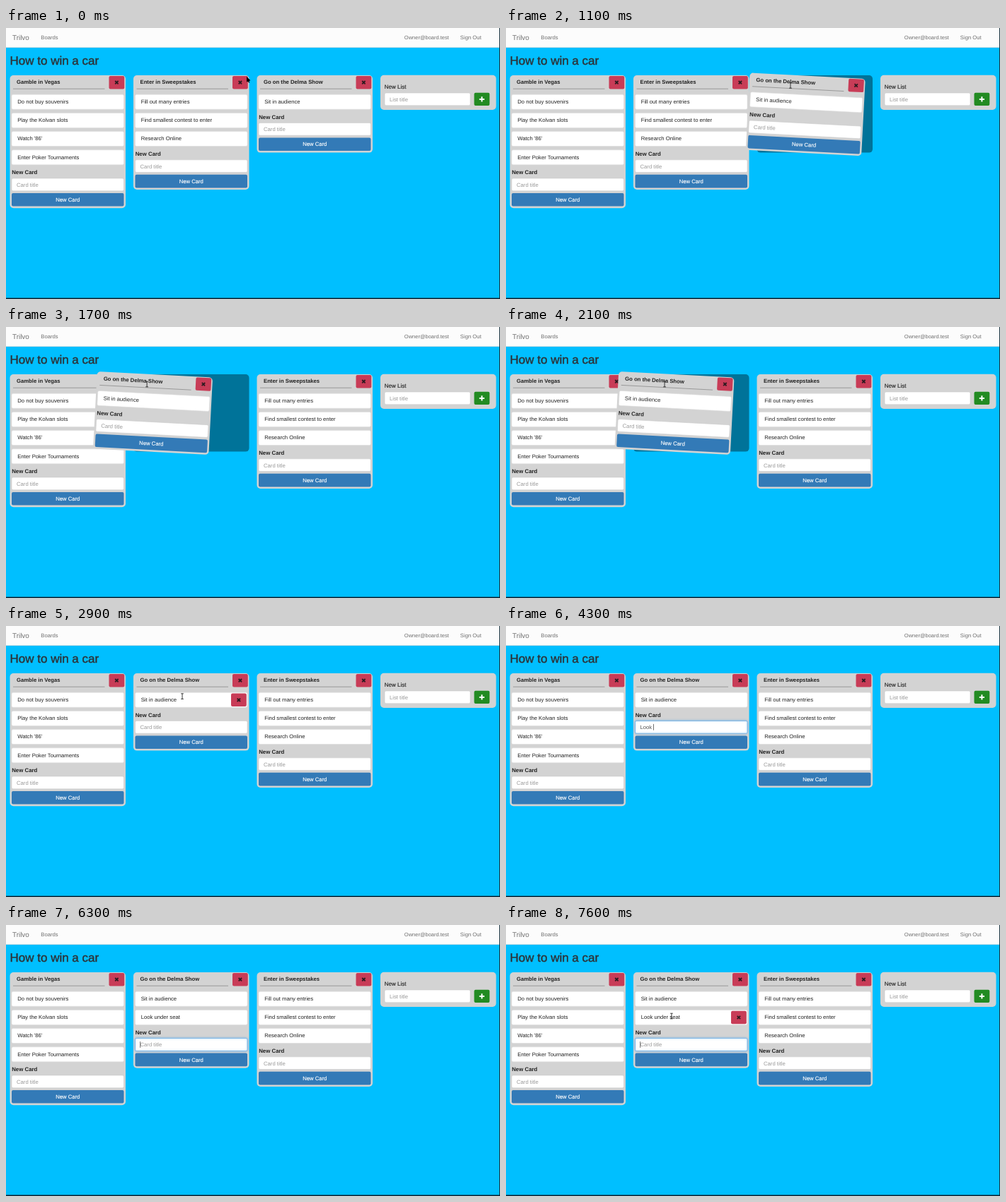
Write an HTML page with a canvas that moves like this. It is 698 by 384 pixels and loops after 8000 ms.

```html
<!DOCTYPE html>
<html lang="en">
<head>
<meta charset="utf-8">
<title>Board</title>
<style>
  html, body { margin: 0; height: 100%; overflow: hidden; background: #00bfff; }
  canvas { display: block; }
</style>
</head>
<body>
<canvas id="stage" width="698" height="384"></canvas>
<script>
const ctx = document.getElementById("stage").getContext("2d");
const LOOP = 8000, COL = 174.5, LEFT = 5.5, TOP = 67, WIDTH = 163.5, PITCH = 26.2;
const PICK = 1000, SWAP = 1500, DROP = 2600, FOCUS = 3600, HIDE = 3900, SUBMIT = 6300, SHOW = 6600;
const ENTRY = "Look under seat", PAUSE = "Look under ".length;

const vegas = { title: "Gamble in Vegas",
  cards: ["Do not buy souvenirs", "Play the Kolvan slots", "Watch '86'", "Enter Poker Tournaments"] };
const sweeps = { title: "Enter in Sweepstakes",
  cards: ["Fill out many entries", "Find smallest contest to enter", "Research Online"] };
const show = { title: "Go on the Delma Show", cards: ["Sit in audience"] };

// Key points of the pointer: time, x, y
const path = [
  [0, 340, 71], [PICK, 423, 81], [1400, 258, 81], [1600, 155, 81], [1700, 199, 81],
  [2100, 224, 81], [DROP, 249, 81], [FOCUS, 242, 144], [SHOW, 262, 160], [7000, 290, 108],
  [7600, 234, 129], [LOOP, 234, 129]
];

// Smooth curve through the key points
function pointer(t) {
  const i = path.findIndex(k => k[0] > t) - 1;
  const a = path[i], b = path[i + 1], p = path[i - 1] || a, n = path[i + 2] || b;
  const d = b[0] - a[0], u = (t - a[0]) / d;
  const axis = j => {
    const m0 = (b[j] - p[j]) / (b[0] - p[0]) * d, m1 = (n[j] - a[j]) / (n[0] - a[0]) * d;
    return a[j] + u * (m0 + u * (3 * (b[j] - a[j]) - 2 * m0 - m1 + u * (2 * (a[j] - b[j]) + m0 + m1)));
  };
  return { x: axis(1), y: axis(2) };
}

// One letter every 100 ms from the given time
const letters = (t, from, max) => Math.max(0, Math.min(max, Math.floor((t - from) / 100) + 1));

function box(x, y, w, h, r, fill, stroke) {
  ctx.beginPath();
  ctx.roundRect(x, y, w, h, r);
  ctx.fillStyle = fill;
  ctx.fill();
  if (stroke) {
    ctx.strokeStyle = stroke;
    ctx.lineWidth = 0.6;
    ctx.stroke();
  }
}

function text(s, x, y, { color = "#222", size = 7.7, bold = false, align = "left", weight = 0 } = {}) {
  ctx.font = `${bold ? "bold " : ""}${size}px "Liberation Sans", Arial, sans-serif`;
  ctx.textAlign = align;
  ctx.fillStyle = ctx.strokeStyle = color;
  ctx.fillText(s, x, y);
  if (weight) {
    ctx.lineWidth = weight;
    ctx.strokeText(s, x, y);
  }
}

function line(color, width, ...segments) {
  ctx.strokeStyle = color;
  ctx.lineWidth = width;
  ctx.beginPath();
  for (const [x1, y1, x2, y2] of segments) {
    ctx.moveTo(x1, y1);
    ctx.lineTo(x2, y2);
  }
  ctx.stroke();
}

function removeButton(x, y) {
  box(x, y, 21.8, 18.4, 2, "#c83c57");
  const cx = x + 10.9, cy = y + 9.2, r = 2.2;
  line("#2d1a20", 1.8, [cx - r, cy - r, cx + r, cy + r], [cx - r, cy + r, cx + r, cy - r]);
}

function field(x, y, w, hint, focus) {
  ctx.save();
  if (focus) {
    ctx.shadowColor = "#66afe9";
    ctx.shadowBlur = 3;
  }
  box(x, y, w, 17.8, 2, "#fff", focus ? "#5aa2e0" : "#ccc");
  ctx.restore();
  const value = focus ? focus.value : "";
  text(value || hint, x + 7, y + 11.8, { color: value ? "#555" : "#999" });
  if (focus && focus.caret) {
    const cx = x + 7.2 + ctx.measureText(value).width;
    line("#333", 0.7, [cx, y + 4.5, cx, y + 13.3]);
  }
}

function drawList({ title, cards }, hover, focus) {
  const end = cards.length * PITCH;
  box(0, 0, WIDTH, end + 83.4, 5, "#d3d3d3");
  text(title, 9.5, 12.2, { bold: true });
  line("#8c8c8c", 0.8, [4.5, 19.2, 134, 19.2]);
  removeButton(140, 1);
  cards.forEach((card, i) => {
    const y = 27.2 + i * PITCH;
    box(2.5, y, 158.5, 21, 2, "#fff", "#ddd");
    text(card, 10.7, y + 12.8);
    if (hover === i) removeButton(138, y + 1.4);
  });
  text("New Card", 2.7, end + 35.3, { bold: true, size: 7.85 });
  field(2.5, end + 41.2, 158.5, "Card title", focus);
  box(2.5, end + 62.2, 158.5, 18.6, 2, "#337ab7");
  text("New Card", WIDTH / 2, end + 74.2, { color: "#fff", align: "center", weight: 0.15 });
}

function placeList(list, col, hover, focus) {
  ctx.save();
  ctx.translate(LEFT + col * COL, TOP);
  drawList(list, hover, focus);
  ctx.restore();
}

// The held list trails the pointer slightly
function dragList(list, t) {
  const p = pointer(t - 20), tilt = Math.min(1, (t - PICK) / 100) * Math.PI / 60;
  ctx.save();
  ctx.translate(p.x + 15, p.y + 41.2);
  ctx.rotate(tilt);
  ctx.translate(-WIDTH / 2, -55);
  drawList(list);
  ctx.restore();
}

function drawPage() {
  box(0, 0, 698, 384, 0, "#00bfff");
  box(0, 0, 697, 27, 0, "#fcfcfc");
  box(0, 27, 697, 1, 0, "#c4dce6");
  box(697, 0, 1, 384, 0, "#1b3440");
  box(0, 382.4, 698, 1.6, 0, "#10202c");
  const color = "#707070";
  text("Trilvo", 9, 17, { color, size: 9.9 });
  text("Boards", 49.3, 16.4, { color });
  text("Owner@board.test", 562.8, 16.4, { color, size: 7.5 });
  text("Sign Out", 641.8, 16.4, { color });
  text("How to win a car", 5.5, 52.2, { color: "#2d3338", size: 17, weight: 0.4 });

  box(529, 66.7, WIDTH, 49.2, 5, "#d3d3d3");
  text("New List", 534.8, 85.7, { size: 8, weight: 0.15 });
  field(535, 92, 121, "List title");
  box(661.5, 91.8, 21.8, 18.2, 2, "#228b22");
  line("#fff", 2, [668.8, 100.9, 676, 100.9], [672.4, 97.3, 672.4, 104.5]);
}

function drawPointer({ x, y }, arrow) {
  if (arrow) {
    ctx.beginPath();
    ctx.moveTo(x, y - 2);
    ctx.lineTo(x, y + 5.5);
    ctx.lineTo(x + 5.3, y + 3.3);
    ctx.closePath();
    ctx.fillStyle = "#000";
    ctx.fill();
    line("#000", 1.4, [x + 2, y + 3, x + 3.6, y + 6.4]);
  } else {
    line("#222", 0.9, [x, y - 3.6, x, y + 3.6],
      [x - 1.8, y - 3.8, x + 1.8, y - 3.8], [x - 1.8, y + 3.8, x + 1.8, y + 3.8]);
  }
}

function draw(t) {
  drawPage();
  const p = pointer(t), seen = t < HIDE || t >= SHOW;
  const dragging = t >= PICK && t < DROP;
  const sent = t >= SUBMIT;
  const current = sent ? { ...show, cards: [...show.cards, ENTRY] } : show;
  const order = t < SWAP ? [vegas, sweeps, current] : [vegas, current, sweeps];
  const typed = sent ? 0 : letters(t, HIDE, PAUSE) + letters(t, 5600, ENTRY.length - PAUSE);
  const focus = t >= FOCUS && { value: ENTRY.slice(0, typed), caret: t < 5400 || t >= 5600 };

  order.forEach((list, col) => {
    const left = LEFT + col * COL;
    if (dragging && list === current) {
      box(left, TOP, WIDTH, 109.6, 5, "#007399");
      return;
    }
    const dx = p.x - left, dy = p.y - TOP - 27.2;
    const inside = seen && !dragging && dx > 2.5 && dx < 161 && dy >= 0 && dy % PITCH < 21;
    placeList(list, col, inside ? Math.floor(dy / PITCH) : -1, list === current && focus);
  });
  if (dragging) dragList(current, t);
  if (seen) drawPointer(p, !dragging && (p.x - LEFT) % COL > 135);
}

ctx.textRendering = "geometricPrecision";
const start = performance.now();
function tick() {
  draw((performance.now() - start) % LOOP);
  requestAnimationFrame(tick);
}
tick();
</script>
</body>
</html>
```
